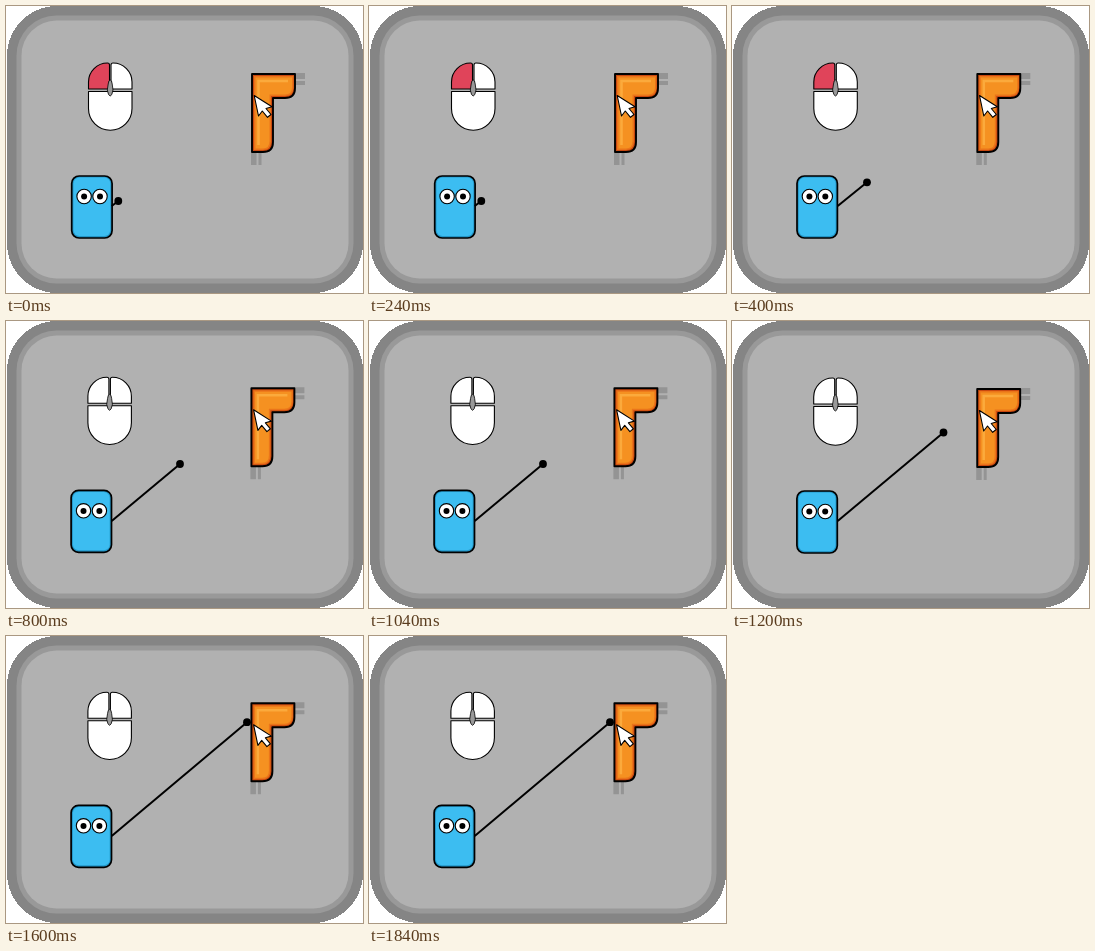
An HTML page for the animation above (2 s loop, 357 by 287 pixels).

```html
<!DOCTYPE html>
<html lang="en">
<head>
<meta charset="utf-8">
<title>Arm reaching for a block</title>
<style>
  html, body { margin: 0; width: 100%; height: 100%; overflow: hidden; background: #fff; }
  svg { display: block; width: 100vw; height: 100vh; }
  .ink { stroke: #000; stroke-linejoin: round; }
</style>
</head>
<body>
<svg viewBox="0 0 357 287" preserveAspectRatio="none">
  <!-- panel -->
  <rect x="1" width="356" height="287" rx="50" fill="#858585" shape-rendering="crispEdges"/>
  <rect x="10.5" y="9.5" width="337" height="268" rx="40" fill="#999"/>
  <rect x="15.5" y="14.5" width="327" height="258" rx="35" fill="#b1b1b1"/>

  <g id="scene">
    <!-- mouse -->
    <g class="ink" fill="#fff" stroke-width="1.1">
      <path id="button" d="M82.5 83V76A19 19 0 0 1 101.500 57Q103.500 57 103.500 59V83Z"/>
      <path d="M105 83V59Q105 57 107 57A19 19 0 0 1 126 76V83Z"/>
      <path d="M82.500 85.500H126V102.500A21.750 21.750 0 0 1 82.500 102.500Z"/>
      <path d="M104.200 74Q105.800 74 106.200 78L107 84Q106 90 104.200 90Q102.300 90 101.300 84L102.200 78Q102.600 74 104.200 74Z" fill="#999" stroke-width=".8"/>
    </g>

    <!-- block -->
    <path d="M289 67h10v6h-10zM289 75h10v4h-10zM245 146h5.500v13h-5.500zM252.500 146h3v13h-3z" fill="#949494"/>
    <path class="ink" d="M246 68H289V82Q289 92 279 92H267V136Q267 146 257 146H246Z" fill="#c9480f" stroke-width="1.900"/>
    <path d="M248 70H287.500V81.500Q287.500 90 279 90H265V135.500Q265 144 257 144H248Z" fill="#ea741a"/>
    <path d="M249.500 71.500H286V81Q286 88.500 279 88.500H263.500V135Q263.500 142.500 257 142.500H249.500Z" fill="#f59121"/>
    <path d="M252.500 139V75H282" fill="none" stroke="#fbaa3c" stroke-width="2.500"/>

    <!-- creature -->
    <rect class="ink" x="65.700" y="170" width="40.400" height="62" rx="7.500" fill="#2497c8" stroke-width="1.700"/>
    <rect x="67.500" y="171.600" width="36.800" height="58.400" rx="6" fill="#3cbdf1"/>
    <g class="ink" fill="#fff" stroke-width="1.100">
      <circle cx="78.100" cy="190.500" r="7.200"/>
      <circle cx="94" cy="190.500" r="7.200"/>
    </g>
    <circle cx="78.100" cy="190.600" r="3"/>
    <circle cx="94" cy="190.600" r="3"/>
  </g>

  <line id="arm" x1="105.700" y1="200" stroke="#000" stroke-width="2"/>
  <circle id="hand" r="3.900"/>
  <path id="pointer" class="ink" d="M248.200 89.500L266 100.800L260 102.500L265 108.500L261.500 111.300L256.300 105L252.500 110Z"
    fill="#fff" stroke-width="1.100"/>
</svg>
<script>
const STEP = 400;
const PRESSED = "#e0445a";
// hand position, scene wobble, button state
const poses = [
  { hand: [112.3, 195], shift: [0, 0], pressed: true },
  { hand: [135, 176.3], shift: [-.7, 0], pressed: true },
  { hand: [174, 143], shift: [-.6, -.7], pressed: false },
  { hand: [211.5, 111.5], shift: [-.8, 0], pressed: false },
  { hand: [241, 86.2], shift: [-.6, -.7], pressed: false },
];
const [scene, arm, hand, button, pointer] =
  ["scene", "arm", "hand", "button", "pointer"].map(id => document.getElementById(id));

function set(el, attrs) {
  for (const name in attrs) el.setAttribute(name, attrs[name]);
}

function draw(time) {
  const { hand: [x, y], shift, pressed } = poses[Math.floor(time / STEP) % poses.length];
  const transform = `translate(${shift})`;
  set(scene, { transform });
  set(pointer, { transform });
  set(arm, { x2: x, y2: y });
  set(hand, { cx: x, cy: y });
  set(button, { fill: pressed ? PRESSED : "#fff" });
}

const start = performance.now();
function tick() {
  draw(performance.now() - start);
  requestAnimationFrame(tick);
}
tick();
</script>
</body>
</html>
```
